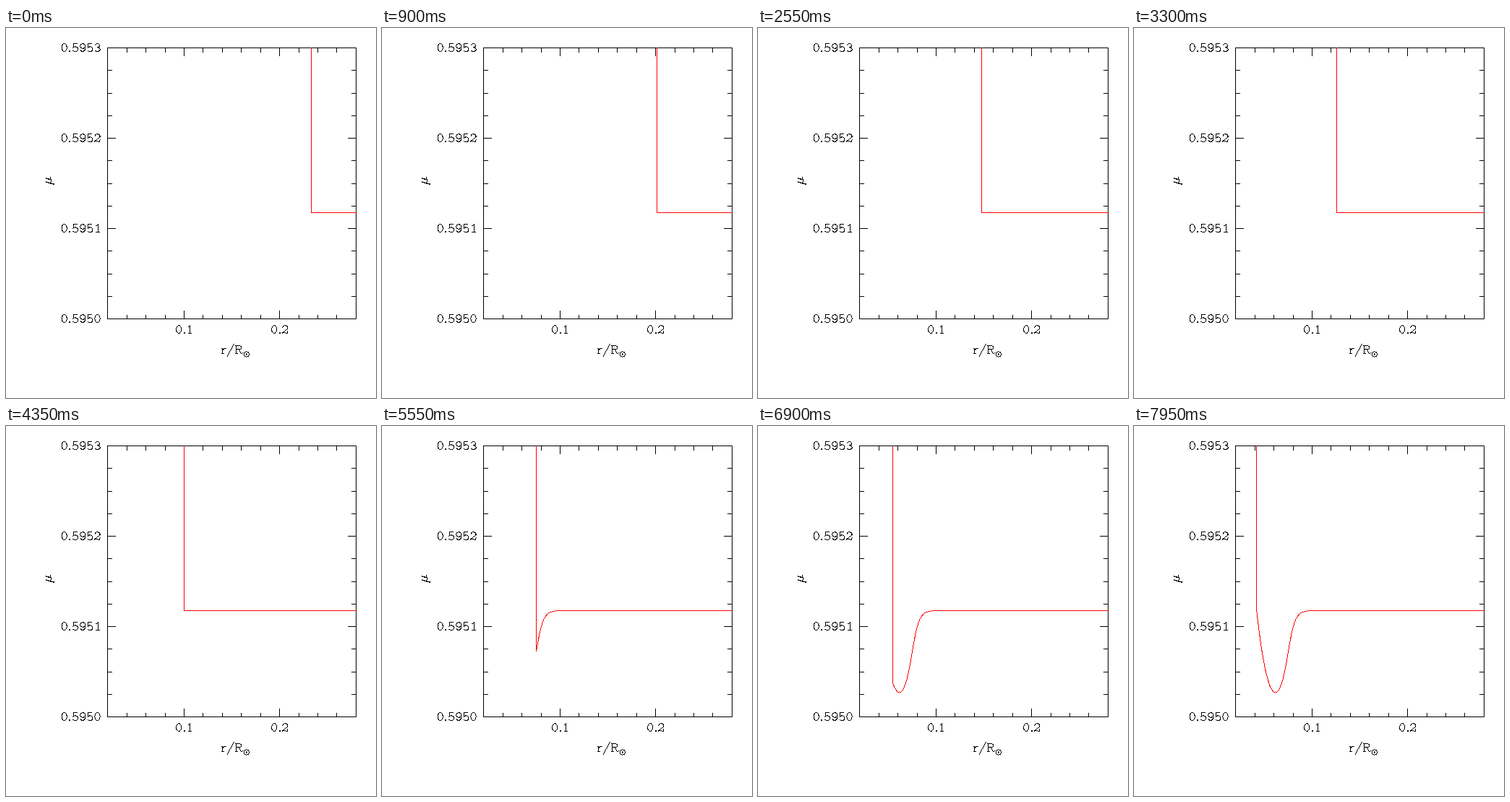
Write a matplotlib script that moves like this. It is 512 by 512 pixels and loops after 8 s.

```python
import numpy as np
import matplotlib.pyplot as plt
from matplotlib.animation import FuncAnimation

SIZE, DPI = 512, 100
LEFT, RIGHT, TOP, BOTTOM = 140, 484, 27, 402
PLATEAU = 255
BLACK, RED = (0, 0, 0), (255, 0, 0)
TICK_MS, STEP_MS, LOOP_MS = 50, 150, 8000
UNIT = 0.51  # pixels per glyph unit


def trace(canvas, xs, ys, color=BLACK):
    """Draw a polyline one pixel wide, without antialiasing."""
    for x0, y0, x1, y1 in zip(xs[:-1], ys[:-1], xs[1:], ys[1:]):
        count = int(np.ceil(max(abs(x1 - x0), abs(y1 - y0)))) + 1
        px = np.floor(np.linspace(x0, x1, count) + 0.5).astype(int)
        py = np.floor(np.linspace(y0, y1, count) + 0.5).astype(int)
        canvas[py, px] = color


def arc(cx, cy, rx, ry, start=0, end=360):
    t = np.radians(np.linspace(start, end, 25))
    return list(zip(cx + rx * np.cos(t), cy + ry * np.sin(t)))


def hline(x0, x1, y):
    return [(x0, y), (x1, y)]


def vline(x, y0, y1):
    return [(x, y0), (x, y1)]


# Stroke lettering: advance width, then polylines above a baseline at y = 0.
GLYPHS = {
    "0": (20, [arc(10, 10.5, 7, 10.5)]),
    "1": (20, [[(6, 17), (11, 21), (11, 0)], hline(7, 15, 0)]),
    "2": (20, [arc(10, 15, 7, 6, 165, -50) + [(3, 2), (3, 0)],
               [(3, 2), (7, 3), (12, 0), (16, 0), (17, 5)]]),
    "3": (20, [arc(10, 16, 6, 5, 150, -90), arc(10, 5.5, 7, 5.5, 90, -150)]),
    "5": (20, [[(15, 21), (5, 21)] + arc(10, 6.5, 7, 6.5, 145, -145)]),
    "9": (20, [arc(10, 14.5, 7, 6.5), arc(10, 10.5, 7, 10.5, 30, -140)]),
    ".": (10, [arc(5, 1, 1, 1)]),
    "r": (17, [vline(6, 0, 14), hline(3, 6, 14), hline(3, 10, 0),
               arc(13, 8, 6, 6, 170, 60)]),
    "/": (22, [[(20, 25), (2, -7)]]),
    "R": (22, [vline(5, 0, 21), hline(2, 8, 0), hline(5, 13, 11),
               hline(2, 13, 21), arc(13, 16, 5, 5, 90, -90),
               [(12, 11), (17, 0), (21, 1)]]),
    "⊙": (16, [arc(7, 0, 7, 7), arc(7, 0, 1, 1)]),
    "μ": (22, [[(8, 14), (2, -7)], [(9, 14), (3, -7)],
               arc(12, 6, 6, 6, 180, 320), [(19, 14), (16, 2), (21, 2)],
               [(18, 14), (15, 2)]]),
}


def write(canvas, text, x, y, upward=False):
    offset = 0
    for char in text:
        advance, strokes = GLYPHS[char]
        for stroke in strokes:
            u, v = np.array(stroke).T * UNIT
            u = u + offset
            trace(canvas, *((x - v, y - u) if upward else (x + u, y - v)))
        offset += advance * UNIT


def draw_axes(canvas):
    trace(canvas, [LEFT, RIGHT, RIGHT, LEFT, LEFT],
          [TOP, TOP, BOTTOM, BOTTOM, TOP])
    for i in range(1, 13):
        x = 140.35 + 26.42 * i
        major = i % 5 == 4
        trace(canvas, [x, x], [TOP, TOP + (11 if major else 6)])
        trace(canvas, [x, x], [BOTTOM, BOTTOM - (11 if major else 5)])
    for i in range(1, 12):
        y = BOTTOM - 31.25 * i
        length = 6 if i % 4 else 11
        trace(canvas, [LEFT, LEFT + length], [y, y])
        trace(canvas, [RIGHT, RIGHT - length], [y, y])
    for i in range(4):
        write(canvas, f"{0.595 + i * 1e-4:.4f}", 75, BOTTOM - 125 * i + 5)
    write(canvas, "0.1", 233.5, 422)
    write(canvas, "0.2", 365.5, 422)
    write(canvas, "r/R", 296, 450)
    write(canvas, "⊙", 328.5, 451)
    write(canvas, "μ", 62, 217, upward=True)


# The front slows down along a quartic through five key positions.
FRONT = np.polyfit([0, 14, 28, 42, 53], [422, 327, 250.2, 197, 169], 4)


def profile(x):
    """Height left behind the front: a smooth step down, then a rise inward."""
    dip = 118 / (1 + np.exp((x - 212.5) / 5))
    rise = 0.048 * np.maximum(199 - x, 0) ** 2.3
    return PLATEAU + dip - rise


def draw_curve(canvas, step):
    front = np.floor(np.polyval(FRONT, step) + 0.5)
    xs = np.arange(front, RIGHT + 1)
    trace(canvas, np.r_[front, xs], np.r_[TOP, profile(xs)], RED)


background = np.full((SIZE, SIZE, 3), 255, np.uint8)
draw_axes(background)

fig = plt.figure(figsize=(SIZE / DPI, SIZE / DPI), dpi=DPI, facecolor="white")
picture = fig.figimage(background, origin="upper")


def update(frame):
    canvas = background.copy()
    draw_curve(canvas, frame * TICK_MS // STEP_MS)
    picture.set_data(canvas)
    return [picture]


anim = FuncAnimation(fig, update, frames=LOOP_MS // TICK_MS, interval=TICK_MS,
                     repeat=True, repeat_delay=0, blit=False)
plt.show()
```
